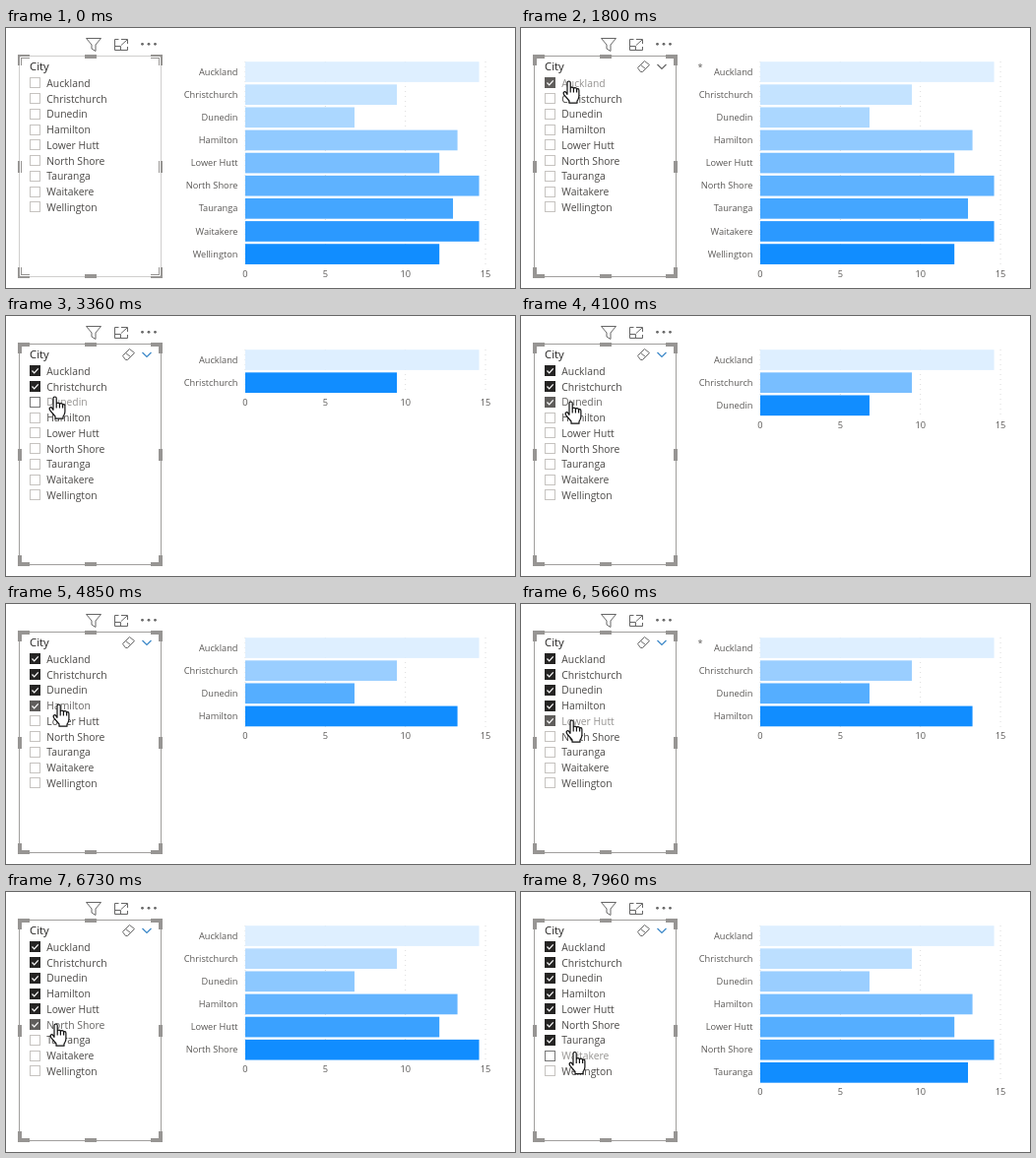
An HTML page that plays this animation: 517x264 px, repeating every 8 s.

```html
<!DOCTYPE html>
<html lang="en">
<head>
<meta charset="utf-8">
<title>City slicer</title>
<style>
  html, body { margin: 0; width: 100%; height: 100%; overflow: hidden; background: #fff; }
  svg { display: block; width: 517px; height: 264px; }
  text { font-family: "Open Sans", "Noto Sans", sans-serif; }
  .item { font-size: 10.35px; fill: #4a4846; }
  .item.hover { fill: #666462; }
  .item.hover.pending { fill: #959391; }
  .title { font-size: 11.3px; font-weight: 500; fill: #252423; }
  .label { font-size: 9.25px; fill: #5a5856; }
  .end { text-anchor: end; }
  .mid { text-anchor: middle; }
  .line { fill: none; stroke: #666; }
  .box rect { fill: #fff; stroke: #c6c3c0; }
  .box path { fill: none; stroke: #fff; stroke-width: 1.2; visibility: hidden; }
  .box.hover rect { stroke: #777; }
  .box.on rect { fill: #252423; stroke: #252423; }
  .box.on.hover rect { fill: #605e5c; stroke: #605e5c; }
  .box.on path { visibility: visible; }
  .grid { stroke: #dcdcdc; stroke-dasharray: 1 4; }
</style>
</head>
<body>
<svg viewBox="0 0 517 264">
  <g class="line">
    <path d="M81.5 10.5H96.5L91 17V23.5L87 21V17Z"/>
    <path d="M114.5 11.5H110.5V22.5H123.5V19M117 11.5H123.5V16M123 12L117 17.5M110.5 18.5H116.5V22.5"/>
  </g>
  <g fill="#666">
    <circle cx="138.5" cy="16.3" r="1.4"/><circle cx="145" cy="16.3" r="1.4"/><circle cx="151.5" cy="16.3" r="1.4"/>
  </g>

  <rect id="frame" x="13.5" y="28.5" width="144" height="224" fill="none" stroke="#a19f9d"/>
  <path id="handles" fill="none" stroke="#979593" stroke-width="4"
    d="M14 38V29H24M80 29H92M147 29H157V38M157 135V147M157 243V252H147M92 252H80M24 252H14V243M14 147V135"/>
  <path id="slits" fill="none" stroke="#fff" d="M14.5 38V29.5H24M147 29.5H156.5V38M156.5 135V147M156.5 243V251.5H147M24 251.5H14.5V243M14.5 147V135"/>

  <text class="title" x="24" y="43">City</text>
  <g id="tools" class="line">
    <path d="M118.5 40.5L125.5 33.5L130.5 37.5L123.5 44.5H121.5ZM121.5 37.5L126.5 41.5"/>
    <path id="chevron" d="M138.5 37L143 41.5L147.5 37" stroke-width="1.2"/>
  </g>
  <g id="list"></g>

  <g id="grid"></g>
  <g id="chart"></g>
  <g id="axis"></g>
  <text id="busy" class="label" x="179.5" y="43">*</text>

  <path id="hand" fill="#fff" stroke="#111" stroke-width="1.2" stroke-linejoin="round"
    d="M5 14.3V2.6a1.6 1.6 0 0 1 3.2 0V8.4q.3-1.2 1.6-1.2 1.5 0 1.6 1.5.4-1 1.6-1 1.4 0 1.6 1.7.3-.7 1.1-.7 1.2 0 1.2 1.6V16q0 2-1.1 3.8L15 21V23.2H7V21L1.8 14.8Q.5 12.8 1.7 11.9 2.9 11.2 4 12.8ZM8.2 8.4V12.5M11.4 8.7V12.5M14.6 9.4V12.5"/>
</svg>

<script>
const LOOP = 8000, ROW = 15.75, STEP = 23.13, X0 = 243, UNIT = 16.27;
const cities = [
  ["Auckland", 14.6], ["Christchurch", 9.47], ["Dunedin", 6.82],
  ["Hamilton", 13.25], ["Lower Hutt", 12.12], ["North Shore", 14.6],
  ["Tauranga", 12.97], ["Waitakere", 14.6], ["Wellington", 12.12]
];
// when the box is ticked, when the chart follows
const clicks = [[1670, 1880], [2620, 2830], [3430, 3640], [4650, 4850],
                [5590, 5730], [6530, 6730], [7490, 7620]];
// start, end, steps, x, y
const moves = [
  [1060, 1410, 6, 42, 53], [2080, 2290, 4, 42, 68.5], [3010, 3360, 6, 43, 81],
  [4100, 4300, 4, 47, 101], [4980, 5320, 6, 45, 117], [5930, 6200, 5, 44, 133],
  [6930, 7270, 6, 46, 150], [7820, 7960, 3, 48, 161.5]
];

const $ = id => document.getElementById(id);
const show = (el, on) => el.style.visibility = on ? "visible" : "hidden";

function add(parent, tag, attrs, text) {
  const el = document.createElementNS("http://www.w3.org/2000/svg", tag);
  for (const k in attrs) el.setAttribute(k, attrs[k]);
  if (text !== undefined) el.textContent = text;
  parent.append(el);
  return el;
}

const rows = cities.map(([name, value], i) => {
  const y = 55.8 + i * ROW, top = Math.round(y - 5.5) + .5;
  const box = add($("list"), "g", { class: "box" });
  add(box, "rect", { x: 24.5, y: top, width: 10, height: 10 });
  add(box, "path", { d: `M26.5 ${top + 5}l2.2 2.4 4-4.6` });
  const item = add($("list"), "text", { class: "item", x: 41.3, y: y + 4 }, name);
  const group = add($("chart"), "g", {});
  const mid = 44.5 + i * STEP;
  add(group, "text", { class: "label end", x: 235.5, y: mid + 3.2 }, name);
  const bar = add(group, "rect", { x: X0, y: mid - 10.3, width: value * UNIT, height: 20.7 });
  return { box, item, group, bar };
});

const ticks = [0, 5, 10, 15].map(v => {
  const x = X0 + v * UNIT;
  return {
    line: add($("grid"), "line", { class: "grid", x1: x, x2: x, y1: 34 }),
    text: add($("axis"), "text", { class: "label mid", x }, v)
  };
});

function shade(p) {
  const mix = (a, b) => Math.round(a + (b - a) * p);
  return `rgb(${mix(222, 17)},${mix(239, 141)},255)`;
}

function handAt(t) {
  let x = -18, y = 92;
  for (const [start, end, n, tx, ty] of moves) {
    if (t < start) break;
    const k = Math.floor((t - start) / (end - start) * (n - 1)) + 1;
    const p = Math.min(1, k / n);
    x += (tx - x) * p;
    y += (ty - y) * p;
  }
  return [x, y];
}

let shown = 0;
function drawChart(n) {
  if (n === shown) return;
  shown = n;
  rows.forEach((r, i) => {
    show(r.group, i < n);
    r.bar.setAttribute("fill", shade(n > 1 ? i / (n - 1) : 0));
  });
  const last = 44.5 + (n - 1) * STEP;
  ticks.forEach(k => {
    k.line.setAttribute("y2", last + 11);
    k.text.setAttribute("y", last + 23.2);
  });
}

function draw(t) {
  const [x, y] = handAt(t);
  const inside = x + 6 > 13;
  const hover = x + 6 > 22 ? Math.floor((y + 1 - 48.1) / ROW) : -1;
  const ticked = clicks.filter(c => t >= c[0]).length;
  const applied = clicks.filter(c => t >= c[1]).length;

  $("hand").setAttribute("transform", `translate(${x} ${y})`);
  show($("hand"), t >= moves[0][0]);
  show($("tools"), inside);
  show($("slits"), !inside);
  $("frame").setAttribute("stroke-dasharray", inside ? "none" : "1 1");
  $("chevron").style.stroke = applied ? "#3a87c8" : "#666";
  show($("busy"), clicks.some(c => t >= c[1] - 80 && t < c[1]));

  rows.forEach((r, i) => {
    r.box.classList.toggle("on", i < ticked);
    r.box.classList.toggle("hover", i === hover);
    r.item.classList.toggle("hover", i === hover);
    r.item.classList.toggle("pending", i >= applied);
  });
  drawChart(applied || cities.length);
}

const begin = performance.now();
function tick() {
  draw((performance.now() - begin) % LOOP);
  requestAnimationFrame(tick);
}
tick();
</script>
</body>
</html>
```
